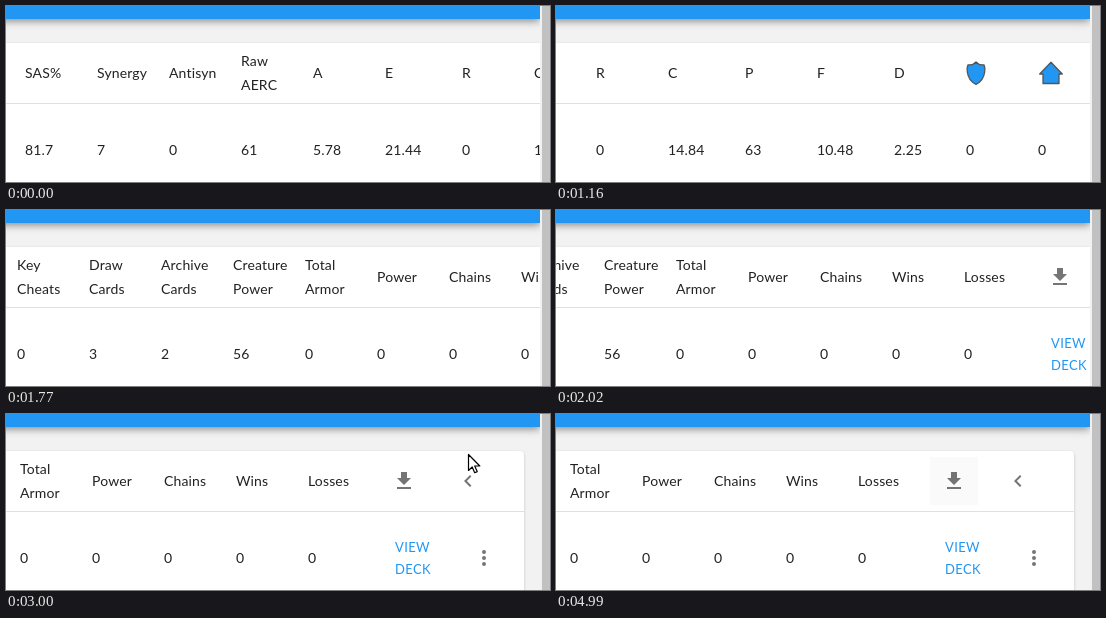
Recreate the animation shown at these times as an HTML page with a canvas. Size 544 by 176 pixels, loop 5.59 s.

```html
<!DOCTYPE html>
<html lang="en">
<head>
<meta charset="utf-8">
<title>Deck table</title>
<style>
  html, body { margin: 0; width: 100%; height: 100%; overflow: hidden; background: #f2f2f2; }
  canvas { display: block; }
</style>
</head>
<body>
<canvas id="stage" width="544" height="176"></canvas>
<script>
const ctx = document.getElementById('stage').getContext('2d');
const LOOP = 5590, VIEW_W = 534, END = 1388;
const BLUE = '#2196f3', INK = 'rgba(0,0,0,0.87)', GREY = 'rgba(0,0,0,0.54)';

// [x, heading, value]
const columns = [
  [19, 'SAS%', '81.7'], [91, 'Synergy', '7'], [163, 'Antisyn', '0'],
  [235, 'Raw AERC', '61'], [307, 'A', '5.78'], [379, 'E', '21.44'],
  [456, 'R', '0'], [528, 'C', '14.84'], [605, 'P', '63'],
  [677, 'F', '10.48'], [754, 'D', '2.25'], [826, '', '0'], [898, '', '0']
];
[['Actions', '9'], ['Raw Amber', '7'], ['Key Cheats', '0'], ['Draw Cards', '3'],
 ['Archive Cards', '2'], ['Creature Power', '56'], ['Total Armor', '0'],
 ['Power', '0'], ['Chains', '0'], ['Wins', '0'], ['Losses', '0']]
  .forEach(([head, value], i) => columns.push([970 + 72 * i, head, value]));

// [start time, scroll offset]
const scrolls = [
  [0, 0], [580, 12], [690, 42], [800, 85], [920, 180], [1040, 300], [1160, 416],
  [1280, 548], [1400, 690], [1520, 832], [1650, 972], [1770, 1103],
  [1900, 1200], [2020, 1282], [2140, 1344], [2260, END]
];

// [start time, shape, x, y]
const pointers = [
  [0, ''], [2880, 'arrow', 488, 37], [3000, 'arrow', 462, 40], [3130, 'arrow', 426, 46],
  [3250, 'hand', 387, 57], [3380, 'hand', 394, 63], [3500, 'hand', 398, 66],
  [3620, 'hand', 401, 68], [4990, '']
];

const icons = {
  download: new Path2D('M19 9h-4V3H9v6H5l7 7 7-7zM5 18v2h14v-2H5z'),
  back: new Path2D('M15.41 7.41L14 6l-6 6 6 6 1.41-1.41L10.83 12z'),
  more: new Path2D('M12 8a2 2 0 1 0 0-4 2 2 0 0 0 0 4zm0 2a2 2 0 1 0 0 4 2 2 0 0 0 0-4zm0 6a2 2 0 1 0 0 4 2 2 0 0 0 0-4z'),
  shield: new Path2D('M0 -11Q-3 -7.5 -8 -8.2Q-9.5 -5 -8.7 -1Q-7.5 8 0 11.3Q7.5 8 8.7 -1Q9.5 -5 8 -8.2Q3 -7.5 0 -11Z'),
  house: new Path2D('M0 -10.8L-11.3 1H-8V10.5H8V1H11.3Z'),
  arrow: new Path2D('M.5 .5V16.5L4.2 13L6.7 18.7L9.2 17.6L6.7 12H11.8Z'),
  hand: new Path2D('M5.5 14V2.5Q5.5 .7 7.2 .7Q9 .7 9 2.5V8Q9.4 6.8 10.8 7Q12.2 7.2 12.2 9Q12.8 7.8 14 8.1Q15.3 8.4 15.3 10Q15.8 9 16.8 9.4Q17.7 9.8 17.7 11.2V16.5Q17.5 18.2 16 20.5V23.3H7V21Q5.5 19.2 3.8 16.3L1 12.7Q.2 11.4 1.4 10.6Q2.6 10 3.8 11.3Z')
};

function at(list, t) {
  let hit = list[0];
  for (const item of list) if (item[0] <= t) hit = item;
  return hit;
}

function rect(x, y, w, h, color) {
  ctx.fillStyle = color;
  ctx.fillRect(x, y, w, h);
}

function text(str, x, y, size = 14, color = INK, spacing = 0.15) {
  ctx.font = `400 ${size}px Lato, sans-serif`;
  ctx.letterSpacing = spacing + 'px';
  ctx.fillStyle = color;
  ctx.fillText(str, x, y);
}

function icon(name, x, y, fill, stroke, width = 1) {
  ctx.save();
  ctx.translate(x, y);
  ctx.fillStyle = fill;
  ctx.fill(icons[name]);
  if (stroke) {
    ctx.strokeStyle = stroke;
    ctx.lineWidth = width;
    ctx.lineJoin = 'round';
    ctx.stroke(icons[name]);
  }
  ctx.restore();
}

function shadowed(blur, dy, color, draw) {
  ctx.save();
  ctx.shadowBlur = blur;
  ctx.shadowOffsetY = dy;
  ctx.shadowColor = color;
  draw();
  ctx.restore();
}

function drawCard(right) {
  shadowed(3, 1, 'rgba(0,0,0,0.2)', () => {
    ctx.fillStyle = '#fff';
    ctx.beginPath();
    ctx.roundRect(-20, 37, right + 20, 180, 4);
    ctx.fill();
  });
  rect(0, 97, right, 1, '#e0e0e0');
}

function drawHover(t) {
  if (t >= 4990) rect(374, 43, 48, 48, '#fafafa');
  else if (t >= 3250) {
    ctx.fillStyle = '#f5f5f5';
    ctx.beginPath();
    ctx.arc(398, 67, 24, 0, Math.PI * 2);
    ctx.fill();
  }
}

function drawTable(scroll) {
  for (const [wx, head, value] of columns) {
    const x = wx - scroll;
    if (x < -80 || x > VIEW_W) continue;
    const words = head.split(' ');
    if (words.length > 1) words.forEach((word, i) => text(word, x, 60 + 24 * i));
    else text(head, x, 72);
    text(value, x, 149);
  }
  icon('shield', 836 - scroll, 67, BLUE, '#555', 1.3);
  icon('house', 911 - scroll, 67, BLUE, '#555', 1.3);

  const dx = END - scroll;
  icon('download', 386 + dx, 55, GREY);
  icon('back', 450 + dx, 55, GREY);
  icon('more', 466 + dx, 132, GREY);
  text('VIEW', 389 + dx, 138, 13, BLUE, 0.37);
  text('DECK', 389 + dx, 160, 13, BLUE, 0.37);
}

function draw(t) {
  const scroll = at(scrolls, t)[1];
  rect(0, 0, 544, 176, '#f2f2f2');

  ctx.save();
  ctx.beginPath();
  ctx.rect(0, 0, VIEW_W, 176);
  ctx.clip();
  drawCard(518 + END - scroll);
  drawHover(t);
  drawTable(scroll);
  shadowed(8, 2, 'rgba(0,0,0,0.45)', () => rect(-20, -20, VIEW_W + 20, 33, BLUE));
  ctx.restore();

  rect(534, 0, 10, 176, '#f1f1f1');
  rect(536, 0, 8, 176, '#c1c1c1');

  const [, shape, x, y] = at(pointers, t);
  if (shape) icon(shape, x, y, '#fff', '#000', 1.2);
  if (shape === 'hand') {
    for (const dx of [9, 12, 15]) rect(x + dx, y + 9, 1, 4, '#000');
  }
}

const start = performance.now();
function tick() {
  draw((performance.now() - start) % LOOP);
  requestAnimationFrame(tick);
}
tick();
</script>
</body>
</html>
```
